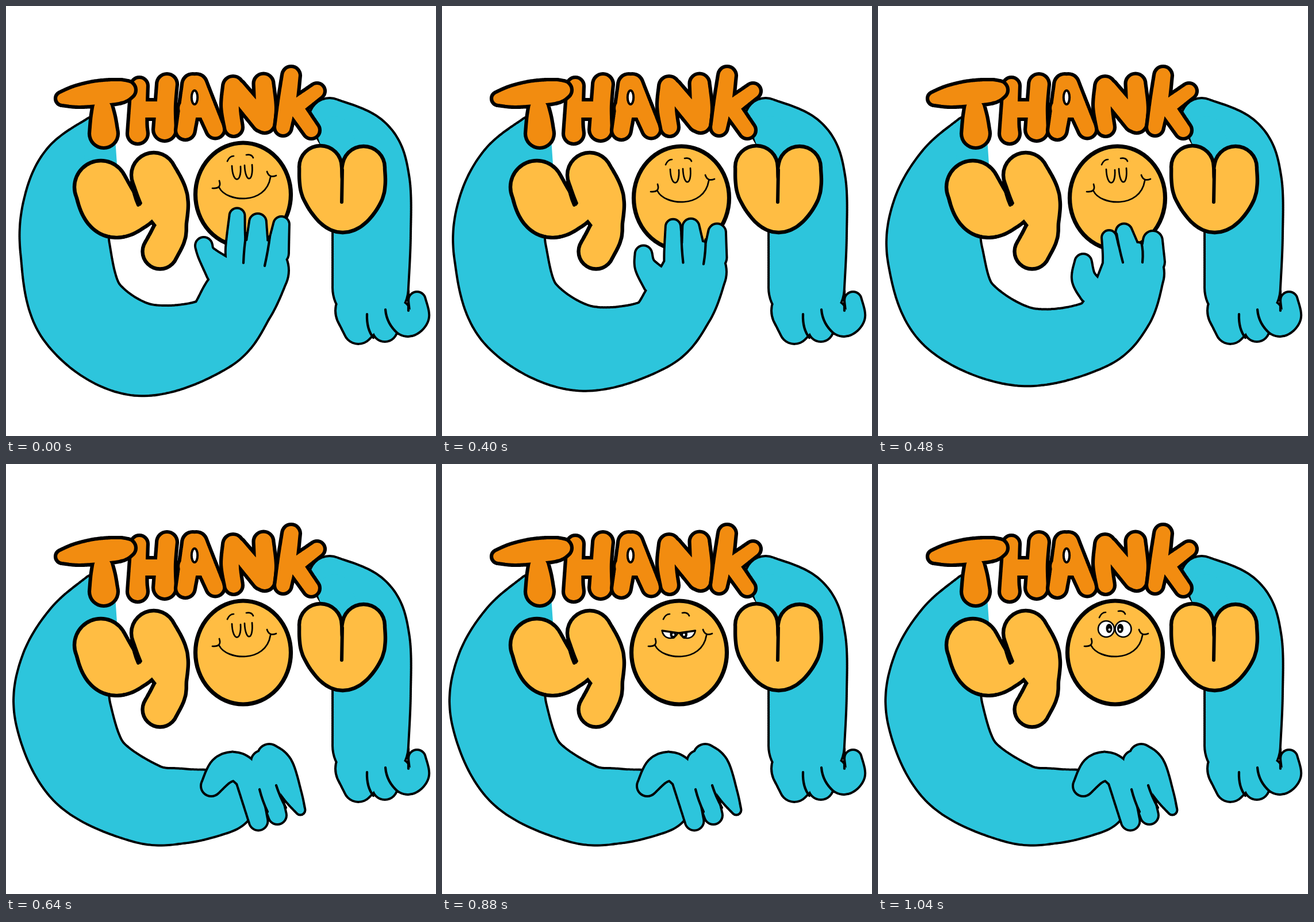
An HTML page with a canvas that plays this animation: 748x748 px, repeating every 1.69 s.

```html
<!DOCTYPE html>
<html lang="en">
<head>
<meta charset="utf-8">
<title>Thank you</title>
<style>
html, body { margin: 0; width: 100%; height: 100%; overflow: hidden; background: #fff; }
canvas { display: block; width: 748px; height: 748px; }
</style>
</head>
<body>
<canvas id="stage" width="748" height="748"></canvas>
<script>
const ctx = document.getElementById('stage').getContext('2d');
const BLUE = '#2dc5dc', ORANGE = '#f28c10', YELLOW = '#ffbd43', INK = '#000', WHITE = '#fff';
const LOOP = 1690, STEPS = 24;

// A figure is a set of soft tubes, each swept through a few discs "x y r".
const figure = s => s.split(';').map(tube =>
  tube.split(',').map(disc => disc.trim().split(/\s+/).map(Number)));

const mix = (a, b, k) => Array.isArray(a) ? a.map((v, i) => mix(v, b[i], k)) : a + (b - a) * k;

const glide = (a, b, c, d, t) =>
  b + t / 2 * (c - a + t * (2 * a - 5 * b + 4 * c - d + t * (3 * (b - c) + d - a)));

function sweep(tubes, grow) {
  const path = new Path2D();
  for (const discs of tubes) {
    const last = discs.length - 1;
    const at = i => discs[Math.max(0, Math.min(last, i))];
    for (let n = 0; n <= last * STEPS; n++) {
      const i = Math.floor(n / STEPS), t = n / STEPS - i;
      const [x, y, r] = [0, 1, 2].map(c =>
        glide(at(i - 1)[c], at(i)[c], at(i + 1)[c], at(i + 2)[c], t));
      path.moveTo(x + r + grow, y);
      path.arc(x, y, r + grow, 0, Math.PI * 2);
    }
  }
  return path;
}

function fill(path, color) {
  ctx.fillStyle = color;
  ctx.fill(path);
}

// Fills the union of all tubes inside one common outline.
function blob(tubes, color, width) {
  fill(sweep(tubes, width / 2), INK);
  fill(sweep(tubes, -width / 2), color);
}

// Straight, quadratic or cubic, depending on the number of points.
function line(width, [x, y, ...rest]) {
  ctx.beginPath();
  ctx.moveTo(x, y);
  ctx[{ 2: 'lineTo', 4: 'quadraticCurveTo', 6: 'bezierCurveTo' }[rest.length]](...rest);
  ctx.lineWidth = width;
  ctx.strokeStyle = INK;
  ctx.stroke();
}

function oval(x, y, rx, ry, color, width) {
  ctx.beginPath();
  ctx.ellipse(x, y, rx, ry, 0, 0, Math.PI * 2);
  ctx.fillStyle = color;
  ctx.fill();
  if (width) {
    ctx.lineWidth = width;
    ctx.strokeStyle = INK;
    ctx.stroke();
  }
}

function shifted([x, y], paint) {
  ctx.save();
  ctx.translate(x, y);
  paint();
  ctx.restore();
}

const glyphs = {
  H: '232 139 15, 229 200 16.5, 229 222 18; 280 136 18, 277 175 18, 276 215 20; 235 180 17, 272 180 17',
  A: '325 137 19, 312 216 17; 331 137 19, 364 214 16.5; 318 178 19, 346 178 19',
  N: '395 140 18, 391 175 17, 396 211 16; 448 135 17.5, 451 175 19, 450 203 18; 400 145 18, 446 200 19',
  K: '496 121 16, 490 165 17, 482 211 15; 541 148 14, 503 176 16; 503 176 16, 531 216 15',
  T: '98 161 12, 125 157 19, 160 152 22, 195 149 21, 210 146 16; 168 178 18, 169 198 22, 170 222 25',
  Y: '165 315 46, 187 355 47, 232 367 20, 262 338 22; 257 294 39, 275 335 41, 287 378 27, 282 400 30, 268 427 30.5',
  U: '547 280 37, 552 320 38, 585 353 41, 616 322 41, 622 281 37'
};
for (const name in glyphs) glyphs[name] = figure(glyphs[name]);

// Arm first, then thumb and three fingers.
const hold = {
  tubes: figure('157 219 28, 118 283 58, 106 350 76, 103 425 78, 132 533 82, 231 597 81, 356 573 64, 405 510 63, 436 460 56;' +
    '344 417 15, 350 433 16, 375 462 27; 402 365 13.5, 400 420 18, 408 450 25; 438 376 15, 436 430 21; 479 380 14, 472 430 20'),
  creases: [[418, 395, 414, 420, 413, 447], [459, 401, 456, 425, 450, 452]]
};
const letGo = {
  tubes: figure('157 219 28, 123 286 57, 101 362 77, 100 437 83, 137 534 80, 250 592 69, 371 574 59, 420 525 59, 443 465 55;' +
    '357 446 15, 358 474 21, 373 496 24; 402 403 13, 407 435 16, 412 465 22; 428 393 14.5, 440 440 22; 478 408 17, 477 445 22'),
  creases: [[415, 396, 419, 420, 426, 446], [458, 411, 462, 426, 460, 446]]
};
const restArm = figure('157 219 28, 123 286 57, 101 362 78, 100 437 84, 142 533 79, 238 589 70, 305 595 65, 370 588 56, 385 582 52');
const restHand = {
  tubes: figure('357 560 18, 378 532 25, 402 527 25, 425 545 25; 421 550 21, 439 621 16.5;' +
    '446 518 20, 454 550 20, 472 611 16; 458 508 21, 475 528 25, 497 573 17, 512 602 8.5'),
  creases: [[441, 566, 446, 586, 455, 605], [470, 559, 476, 578, 487, 598]]
};
const rightArm = {
  tubes: figure('563 196 36, 618 246 60, 635 305 67, 636 400 68, 634 490 66; 618 530 45, 613 562 26;' +
    '650 530 24, 659 562 22; 715 512 15, 718 540 18, 699 552 23, 680 535 24'),
  creases: [[660, 528, 662, 553, 682, 570], [628, 536, 627, 562, 639, 577], [700, 495, 700, 530]]
};
const leftShoulder = figure('163 245 28, 165 275 28');
const rightShoulder = figure('572 222 30, 580 245 30');

function limb({ tubes, creases }) {
  blob(tubes, BLUE, 4);
  creases.forEach(c => line(4.2, c));
}

function eye(x, side, lid) {
  const outer = 273 + lid * 17, inner = 273 + lid * 21;
  const [l, r] = side < 0 ? [outer, inner] : [inner, outer];
  ctx.save();
  if (lid) {
    ctx.beginPath();
    ctx.moveTo(x - 18, l);
    ctx.lineTo(x + 18, r);
    ctx.lineTo(x + 18, 320);
    ctx.lineTo(x - 18, 320);
    ctx.clip();
  }
  oval(x, 287 + lid * 2, 14, 14, WHITE, 2.6);
  oval(x - side * 5, 286 + lid * 10, 5.5, 8, INK);
  oval(x - side * 5.5, 288 + lid * 9, 1.9, 1.9, WHITE);
  ctx.restore();
  if (lid) line(3.4, [x - 14, l, x + 14, r]);
}

// lid: 0 wide open, 1 half shut, none for closed eyes
function face(lid) {
  const pen = 2.7, shut = lid === undefined, lift = shut ? 0 : (lid - 1) * 3;
  oval(412.5, 328, 83, 90, YELLOW, 7.2);
  line(pen, [371, 316, 383, 341, 452, 347, 460, 298]);
  line(pen, [371, 304, 376, 318, 359, 317]);
  line(pen, [454, 288, 458, 300, 470, 295]);
  line(pen, [385, 270 + lift, 389, 261 + lift, 396, 261 + lift]);
  line(pen, [418, 259 + lift, 427, 257 + lift, 430, 264 + lift]);
  if (shut) {
    line(pen, [393, 278, 394, 309, 410, 309, 408, 279]);
    line(pen, [415, 277, 416, 308, 431, 308, 428, 276]);
  } else {
    eye(397, -1, lid);
    eye(426.5, 1, lid);
  }
}

function leftArm({ grip, hand, arm = [0, 0] }) {
  if (hand) {
    blob(restArm, BLUE, 4);
    shifted(hand, () => limb(restHand));
  } else {
    shifted(arm, () => limb({
      tubes: mix(hold.tubes, letGo.tubes, grip),
      creases: mix(hold.creases, letGo.creases, grip)
    }));
  }
  fill(sweep(leftShoulder, 0), BLUE);
}

function lettering() {
  blob(glyphs.Y, YELLOW, 6.4);
  line(6, [219, 305, 222, 328, 230, 346]);
  blob(glyphs.U, YELLOW, 6.4);
  line(6, [585, 285, 584, 341]);
  for (const letter of 'HANKT') {
    blob(glyphs[letter], ORANGE, 6.2);
    if (letter === 'A') oval(328, 159, 5.2, 12, WHITE, 4);
  }
}

const home = [0, 0], pushed = [4, 6];
const poses = [
  { t: 0, grip: 0, head: home },
  { t: 320, grip: 0, head: pushed, arm: [2.5, -2] },
  { t: 400, grip: 0.5, head: pushed },
  { t: 480, grip: 1, head: pushed },
  { t: 560, hand: [-3, 4], head: [-4, -1] },
  { t: 640, hand: home, head: home },
  { t: 880, hand: home, head: home, lid: 1 },
  { t: 960, hand: home, head: home, lid: 0.45 },
  { t: 1040, hand: home, head: home, lid: 0 }
];

function draw(pose) {
  ctx.fillStyle = WHITE;
  ctx.fillRect(0, 0, 748, 748);
  ctx.lineJoin = ctx.lineCap = 'round';
  shifted(pose.head, () => face(pose.lid));
  leftArm(pose);
  limb(rightArm);
  fill(sweep(rightShoulder, 0), BLUE);
  lettering();
}

const start = performance.now();
let shown;
function tick() {
  const t = (performance.now() - start) % LOOP;
  const pose = poses.filter(p => p.t <= t).pop();
  if (pose !== shown) draw(shown = pose);
  requestAnimationFrame(tick);
}
tick();
</script>
</body>
</html>
```
